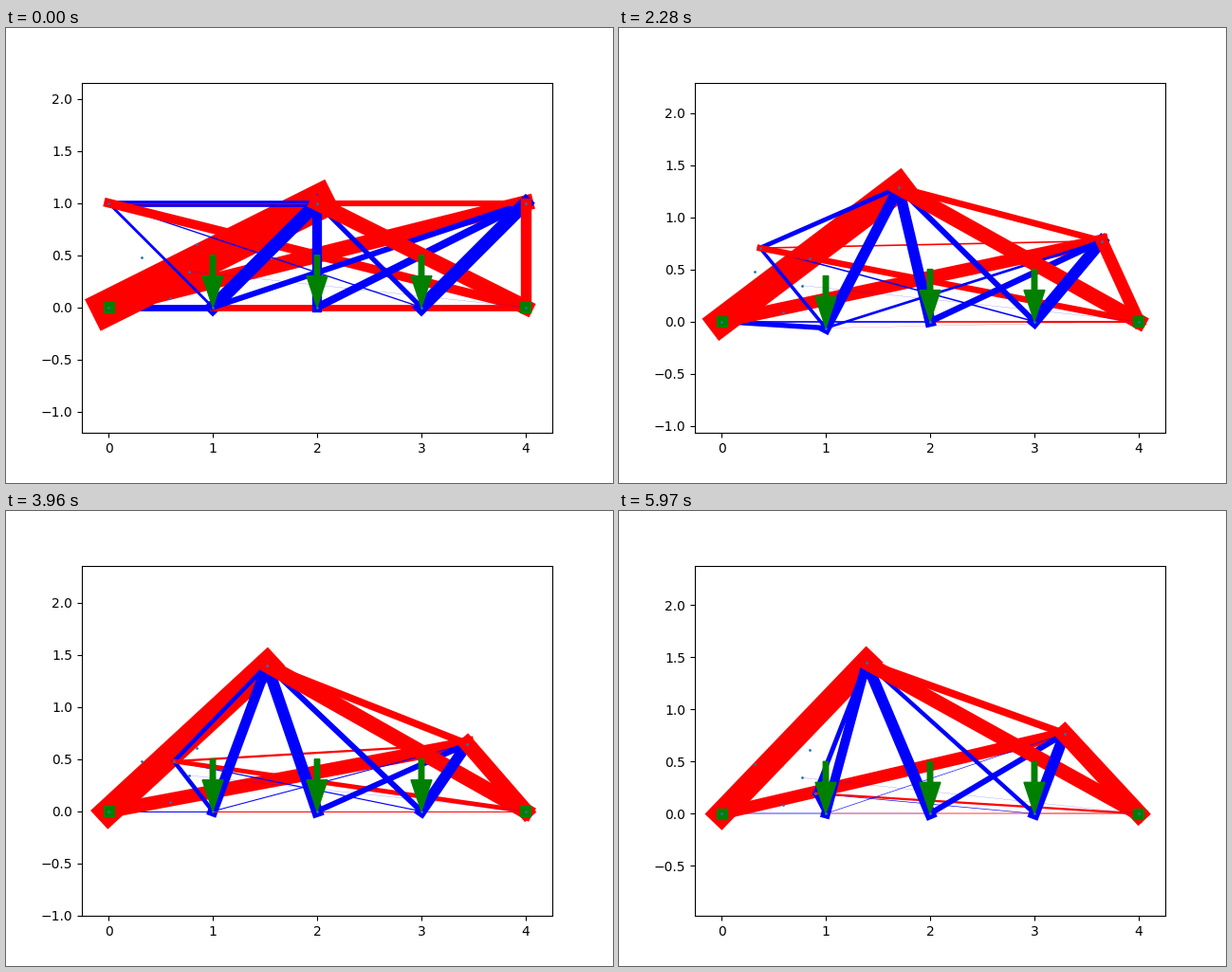
Animation, 640 px wide and 480 px high, one loop 6000 ms. Source, as a matplotlib script:

```python
import matplotlib.pyplot as plt
import numpy as np
from matplotlib.animation import FuncAnimation
from matplotlib.patches import FancyArrow, Rectangle

FRAMES, INTERVAL = 200, 30
PX = 72 / 100            # points per pixel
LOAD = 13.9              # load on each deck node, in line-width pixels
HALF = 4.51 * 369.6 / 496 / 2

# Lattice order, column by column; 0 and 6 are supports, 1, 4 and 7 are free.
START = np.array([(0, 0), (0, 1), (1, 0), (2, 0),
                  (2, 1), (3, 0), (4, 0), (4, 1)], float)
LOADED, FREE = [2, 3, 5], [1, 2, 3, 4, 5, 7]
LOOSE = np.array([[.318, .478], [.845, .608], [.768, .345], [.592, .085]])

# First and last force of each web bar: tension positive, compression negative.
WEB = {
    (0, 4): (-33, -24), (0, 7): (-16, -12), (1, 2): (2.5, 5),
    (1, 4): (6, 5), (1, 5): (1.5, 1), (1, 6): (-9, -2.5),
    (1, 7): (-1, -2.5), (2, 4): (12, 11), (3, 4): (11, 12),
    (3, 7): (7, 5), (4, 5): (4.5, 5.5), (4, 6): (-18, -16),
    (4, 7): (-7, -8), (5, 7): (14, 10), (6, 7): (-11, -18),
}
# Bars that fade to hairlines.
FADING = {(0, 2): 4.5, (0, 3): 4.5, (2, 7): 7,
          (2, 6): -4.5, (3, 6): -4.5, (5, 6): -4.5}
BARS = sorted([*WEB, *FADING])


def ease(s, a, b, power):
    return a + (b - a) * (1 - (1 - s) ** power)


def nodes_at(t, s):
    p = START.copy()
    p[1] = ease(s, 0, .90, 1.1), ease(s, 1, .193, .95)
    p[4] = ease(s, 2, 1.39, 1.42), ease(s, 1, 1.448, 2.1)
    p[7] = ease(s, 4, 3.29, 1.43), max(1 - .1 * t, .408 + .06 * t)
    p[2, 1] = min(0, max(-.15 * t, .0445 * t - .165))
    return p


def forces_at(t, s, nodes):
    """Rough bar forces, brought into equilibrium at the free nodes."""
    rough = {bar: a + (b - a) * s for bar, (a, b) in WEB.items()}
    for bar, a in FADING.items():
        rough[bar] = a * np.exp(-t / 2) + .3 * np.sign(a)
    rough[0, 2] -= 60 * nodes[2, 1]      # the sagging node pulls its chords
    rough[2, 6] -= 25 * nodes[2, 1]
    q = np.array([rough[bar] for bar in BARS])

    pull = np.zeros((len(nodes), 2, len(BARS)))
    for k, (i, j) in enumerate(BARS):
        u = nodes[j] - nodes[i]
        u /= np.hypot(*u)
        pull[i, :, k], pull[j, :, k] = u, -u
    need = np.zeros((len(nodes), 2))
    need[LOADED, 1] = LOAD
    A, f = pull[FREE].reshape(-1, len(BARS)), need[FREE].ravel()
    W = np.abs(q)
    S = (A * W) @ A.T + .1 * np.eye(len(f))
    return q + W * (A.T @ np.linalg.solve(S, f - A @ q))


fig, ax = plt.subplots(figsize=(6.4, 4.8), dpi=100)
ax.set_xlim(-.255, 4.255)

lines = [ax.plot([], [])[0] for _ in BARS]
ax.plot([LOOSE[2, 0], 4], [LOOSE[2, 1], 0], color="blue", lw=.15 * PX)
for x in (0, 4):
    ax.add_patch(Rectangle((x - .05, -.05), .1, .1, color="green", zorder=3))
arrows = [ax.add_patch(FancyArrow(x, .5, 0, -.5, width=.05, head_width=.2,
                                  head_length=.3, length_includes_head=True,
                                  color="green", zorder=3))
          for x in START[LOADED, 0]]
dots, = ax.plot([], [], "o", ms=1, color="C0", zorder=4)


def update(frame):
    t, s = frame * INTERVAL / 1000, frame / (FRAMES - 1)
    nodes = nodes_at(t, s)
    for line, bar, q in zip(lines, BARS, forces_at(t, s, nodes)):
        line.set_data(*nodes[list(bar)].T)
        line.set_linewidth(abs(q) * PX)
        line.set_color("blue" if q > 0 else "red")
    arrows[0].set_data(y=nodes[2, 1] + .5)
    dots.set_data(*np.vstack([nodes, LOOSE]).T)
    mid = (nodes[:, 1].max() + min(-.05, nodes[2, 1])) / 2
    ax.set_ylim(mid - HALF, mid + HALF)
    return lines


anim = FuncAnimation(fig, update, frames=FRAMES, interval=INTERVAL,
                     repeat=True, repeat_delay=0, blit=False)
plt.show()
```
